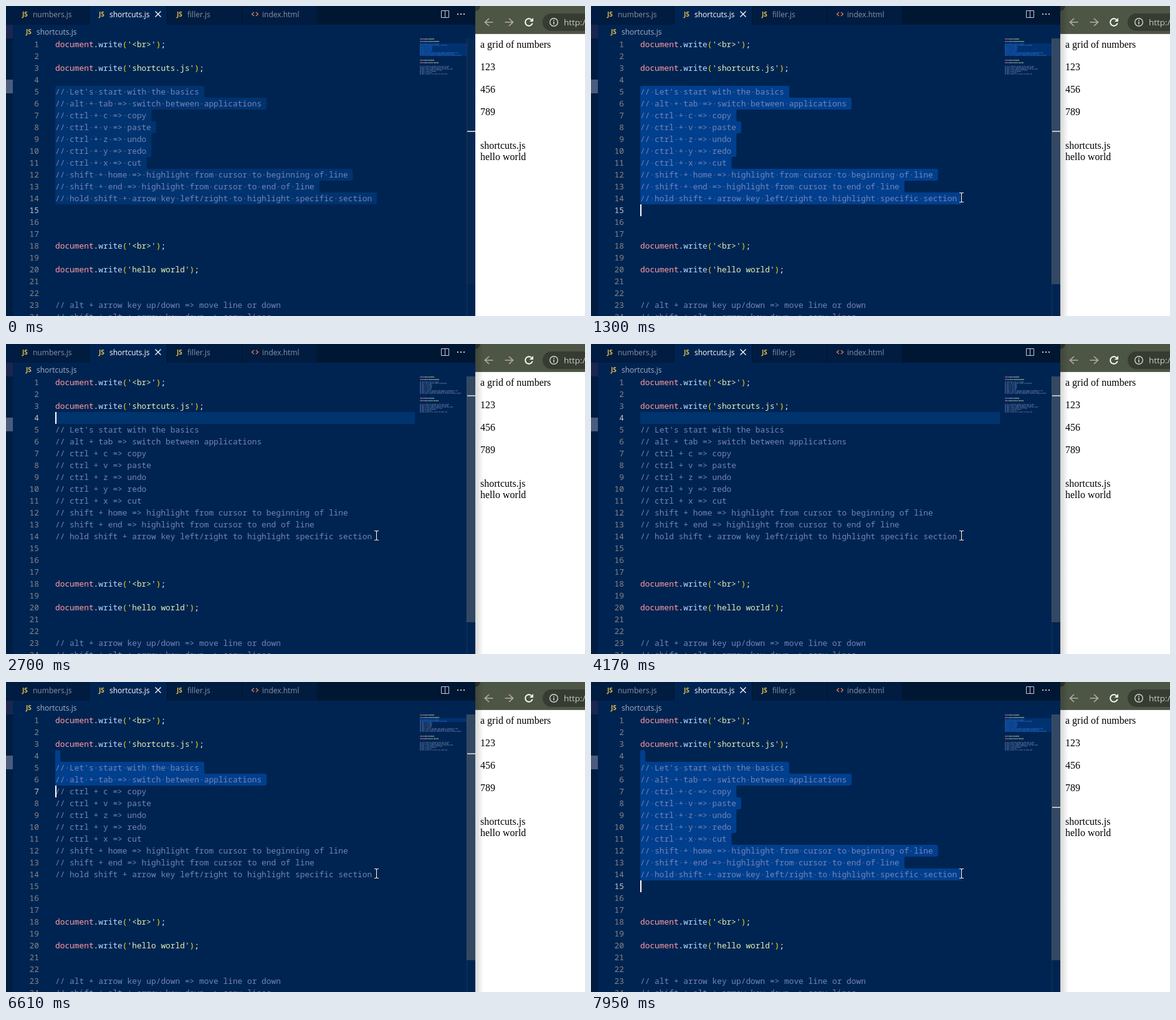
Animation, 929 px wide and 497 px high, one loop 8000 ms. Source, as an HTML page with a canvas:

```html
<!DOCTYPE html>
<html lang="en">
<head>
<meta charset="utf-8">
<title>Editor shortcuts</title>
<style>
html, body { margin: 0; width: 100%; height: 100%; overflow: hidden; background: #002451; }
canvas { display: block; }
</style>
</head>
<body>
<canvas id="stage" width="929" height="497"></canvas>
<script>
const ctx = document.getElementById('stage').getContext('2d');
const LOOP = 8000, LEFT = 79, TOP = 52, ROW = 19, CHAR = 7.7;
const MONO = '12.83px "Noto Sans Mono", "DejaVu Sans Mono", monospace';
const UI = '12px "Open Sans", "Noto Sans", sans-serif';
const SERIF = '16px "Liberation Serif", "Noto Serif", serif';
const BG = '#002451', COMMENT = '#7285b7';

const lines = [
  "document.write('<br>');", '', "document.write('shortcuts.js');", '',
  "// Let's start with the basics",
  '// alt + tab => switch between applications',
  '// ctrl + c => copy',
  '// ctrl + v => paste',
  '// ctrl + z => undo',
  '// ctrl + y => redo',
  '// ctrl + x => cut',
  '// shift + home => highlight from cursor to beginning of line',
  '// shift + end => highlight from cursor to end of line',
  '// hold shift + arrow key left/right to highlight specific section',
  '', '', '',
  "document.write('<br>');", '', "document.write('hello world');", '', '',
  '// alt + arrow key up/down => move line or down',
  '// shift + alt + arrow key down => copy lines',
  // below the fold, seen only in the minimap
  '// ctrl + shift + arrow left/right => pick whole word',
  '// ctrl + d => select the next match',
  '// ctrl + slash => comment',
  '// ctrl + f => find',
  '// ctrl + shift + k => delete the whole line'
];

const caretFlips = [1020, 1500, 1970, 2430, 2700, 3230, 3690, 4170, 4760, 5160, 5690];
// caret line grows by one at each of these times, from line 4
const lineSteps = [6150, 6410, 6610, 6740, 6870, 7090, 7220, 7420, 7620, 7750, 7950];
const passed = (times, t) => times.filter(x => x <= t).length;

function stateAt(t) {
  const line = t < 2700 ? 15 : 4 + passed(lineSteps, t);
  const first = t < 2700 ? 5 : 4;
  return {
    line, first, last: line - 1,
    selecting: line > first,
    focused: t >= 1020,
    caret: passed(caretFlips, t) % 2 === 1,
    slider: Math.min(1, Math.max(0.12, (t - 340) / 150))
  };
}

const rowTop = n => TOP + (n - 1) * ROW;
const lineEnd = n => LEFT + lines[n - 1].length * CHAR + 8;

function box(x, y, w, h, color) {
  ctx.fillStyle = color;
  ctx.fillRect(x, y, w, h);
}

function label(text, x, y, font, color) {
  ctx.font = font;
  ctx.fillStyle = color;
  ctx.fillText(text, x, y);
}

function stroke(color, width, draw) {
  ctx.strokeStyle = color;
  ctx.lineWidth = width;
  ctx.beginPath();
  draw();
  ctx.stroke();
}

function poly(...p) {
  ctx.moveTo(p[0], p[1]);
  for (let i = 2; i < p.length; i += 2) ctx.lineTo(p[i], p[i + 1]);
}

function colorsOf(text) {
  if (text.startsWith('//')) return () => COMMENT;
  const open = text.indexOf('('), close = text.lastIndexOf(')');
  return i => {
    if (i < 8) return '#ff9da4';
    if (i === 8 || i > close) return '#ffffff';
    if (i < open) return '#bbdaff';
    return i === open || i === close ? '#ffd700' : '#e0f2b4';
  };
}

function drawSelection(s) {
  const color = s.focused ? '#003f8e' : '#00336f';
  for (let n = s.first; n <= s.last; n++) {
    const y = rowTop(n), end = lineEnd(n);
    const prev = n > s.first ? lineEnd(n - 1) : 0;
    const next = n < s.last ? lineEnd(n + 1) : 0;
    ctx.fillStyle = color;
    ctx.beginPath();
    ctx.roundRect(LEFT, y, end - LEFT, ROW, [
      n === s.first ? 3 : 0, prev < end ? 3 : 0,
      next < end ? 3 : 0, n === s.last ? 3 : 0
    ]);
    ctx.fill();
    if (prev > end) notch(end, y, 3);
    if (next > end) notch(end, y + ROW, -3);
  }
}

// concave corner where a wider row meets a narrower one
function notch(x, y, r) {
  ctx.beginPath();
  ctx.moveTo(x, y);
  ctx.lineTo(x + 3, y);
  ctx.quadraticCurveTo(x, y, x, y + r);
  ctx.fill();
}

function drawCode(s) {
  if (s.selecting) drawSelection(s);
  else box(LEFT, rowTop(s.line), 577, ROW, '#00346e');
  ctx.font = MONO;
  for (let n = 1; n <= 24; n++) {
    const text = lines[n - 1], y = rowTop(n) + 14, color = colorsOf(text);
    const picked = s.selecting && n >= s.first && n <= s.last;
    const num = String(n);
    ctx.fillStyle = n === s.line ? '#c6c6c6' : '#858585';
    for (let i = 0; i < num.length; i++) {
      ctx.fillText(num[i], 53 - (num.length - i) * CHAR, y);
    }
    for (let i = 0; i < text.length; i++) {
      const x = LEFT + i * CHAR;
      if (text[i] !== ' ') {
        ctx.fillStyle = color(i);
        ctx.fillText(text[i], x, y);
      } else if (picked) {
        box(x + 3, y - 5, 1.6, 1.6, '#4a6199');
      }
    }
  }
  if (s.caret) box(LEFT, rowTop(s.line), 2, ROW, '#ffffff');
}

function drawMinimap(s) {
  lines.forEach((text, k) => {
    const n = k + 1, y = TOP + k * 2, color = colorsOf(text);
    const picked = s.selecting && n >= s.first && n <= s.last;
    if (picked) {
      box(664, y, 75, 2, '#003270');
      box(664, y, text.length + 1, 2, '#003f8e');
    }
    for (let i = 0; i < text.length; i++) {
      if (text[i] === ' ') continue;
      ctx.globalAlpha = (picked ? 0.15 : 0.5) + (text.charCodeAt(i) % 4) * 0.06;
      box(664 + i, y + 0.3, 1, 1.3, color(i));
    }
    ctx.globalAlpha = 1;
  });
}

function drawScrollbar(s) {
  box(739, TOP, 1, 445, 'rgba(127,127,127,.18)');
  ctx.globalAlpha = s.slider;
  box(739, TOP, 14, 394, 'rgba(121,121,121,.42)');
  ctx.globalAlpha = 1;
  box(740, Math.round(82 + (s.line - 4) * 10.73), 13, 2, '#b9bfc6');
}

const jsIcon = (x, y) =>
  label('JS', x, y, 'bold 10px "Open Sans", "Noto Sans", sans-serif', '#e0c04f');

function drawTabs() {
  box(0, 0, 753, 30, '#001733');
  box(0, 0, 499, 30, '#001c40');
  box(134, 0, 124, 30, BG);
  for (const x of [133, 258, 378, 499]) box(x, 0, 1, 30, '#00152f');
  const dim = '#8793a6';
  jsIcon(26, 17);
  label('numbers.js', 43, 18, UI, dim);
  jsIcon(149, 17);
  label('shortcuts.js', 166, 18, UI, '#ffffff');
  jsIcon(274, 17);
  label('filler.js', 291, 18, UI, dim);
  label('index.html', 411, 18, UI, dim);
  stroke('#d9825b', 1.3, () => {
    poly(398, 10, 394.5, 13, 398, 16);
    poly(401, 10, 404.5, 13, 401, 16);
  });
  stroke('#ffffff', 1.3, () => {
    poly(239.5, 8.5, 248.5, 17.5);
    poly(248.5, 8.5, 239.5, 17.5);
  });
  stroke('#c5ccd6', 1, () => {
    ctx.rect(698.5, 7.5, 12, 11);
    poly(704.5, 7, 704.5, 19);
  });
  for (const x of [724, 729, 734]) box(x, 12, 2, 2, '#c5ccd6');
  jsIcon(32, 45);
  label('shortcuts.js', 49, 46, UI, '#a6b1c4');
}

function drawSidebar() {
  box(0, 0, 11, 497, '#001c40');
  box(0, 30, 11, 22, '#1b2550');
  box(0, 118, 11, 22, '#4b5b7c');
}

function arrow(x, dir) {
  stroke('#b5aca6', 1.7, () => {
    poly(x - 6.5 * dir, 26, x + 6 * dir, 26);
    poly(x, 20, x + 6.5 * dir, 26, x, 32);
  });
}

function drawBrowser(s) {
  box(753, 0, 176, 497, '#ffffff');
  box(753, 0, 176, 45, '#4d5545');
  ctx.fillStyle = '#30362c';
  ctx.beginPath();
  ctx.moveTo(753, 0);
  ctx.lineTo(761, 0);
  ctx.quadraticCurveTo(760, 7, 753, 8);
  ctx.fill();
  box(753, 44, 176, 1, '#626a5b');
  arrow(775, -1);
  arrow(807, 1);
  stroke('#ffffff', 1.9, () => ctx.arc(839, 26, 5.8, 0.25, 5.5));
  ctx.fillStyle = '#ffffff';
  ctx.beginPath();
  poly(846, 19, 846, 25, 840, 25);
  ctx.fill();
  ctx.fillStyle = '#363c31';
  ctx.beginPath();
  ctx.roundRect(861, 12, 90, 28, 14);
  ctx.fill();
  stroke('#d5d5cf', 1.4, () => ctx.arc(879, 26, 6.3, 0, 7));
  box(878.2, 25, 1.6, 4.5, '#d5d5cf');
  box(878.2, 22.3, 1.6, 1.6, '#d5d5cf');
  label('http:/', 895, 31, '13.5px "Open Sans", "Noto Sans", sans-serif', '#c9cac4');

  const page = [['a grid of numbers', 67], ['123', 103], ['456', 139], ['789', 175],
    ['shortcuts.js', 229], ['hello world', 247]];
  for (const [text, y] of page) label(text, 761, y, SERIF, '#000000');

  if (s.focused) {
    const g = ctx.createLinearGradient(753, 0, 766, 0);
    g.addColorStop(0, 'rgba(0,0,0,.16)');
    g.addColorStop(1, 'rgba(0,0,0,0)');
    box(753, 0, 13, 497, g);
  }
}

// pointer enters from below, bends right and settles after the last code line
function pointerAt(t) {
  if (t < 340) return null;
  const q = Math.min(1300, 340 + Math.floor((t - 340) / 75) * 75);
  if (t >= 1300) return [594.5, 307.5];
  if (q >= 1090) return [580 + (q - 1090) / 210 * 14.5, 308];
  const u = (q - 340) / 750, v = 1 - u;
  return [
    v * v * 500 + 2 * u * v * 500 + u * u * 580,
    v * v * 500 + 2 * u * v * 318 + u * u * 308
  ];
}

function drawPointer(t) {
  const p = pointerAt(t);
  if (!p) return;
  const x = Math.floor(p[0]) + 0.5, y = Math.floor(p[1]);
  const beam = () => {
    poly(x - 3.5, y - 7.5, x - 1, y - 7.5, x, y - 6.5, x + 1, y - 7.5, x + 3.5, y - 7.5);
    poly(x, y - 6.5, x, y + 6.5);
    poly(x - 3.5, y + 7.5, x - 1, y + 7.5, x, y + 6.5, x + 1, y + 7.5, x + 3.5, y + 7.5);
  };
  stroke('rgba(0,0,0,.55)', 2.6, beam);
  stroke('#ffffff', 1.1, beam);
}

function draw(t) {
  const s = stateAt(t);
  box(0, 0, 929, 497, BG);
  drawCode(s);
  drawMinimap(s);
  drawScrollbar(s);
  drawSidebar();
  drawTabs();
  drawBrowser(s);
  drawPointer(t);
}

const start = performance.now();
function tick() {
  draw((performance.now() - start) % LOOP);
  requestAnimationFrame(tick);
}
tick();
</script>
</body>
</html>
```
